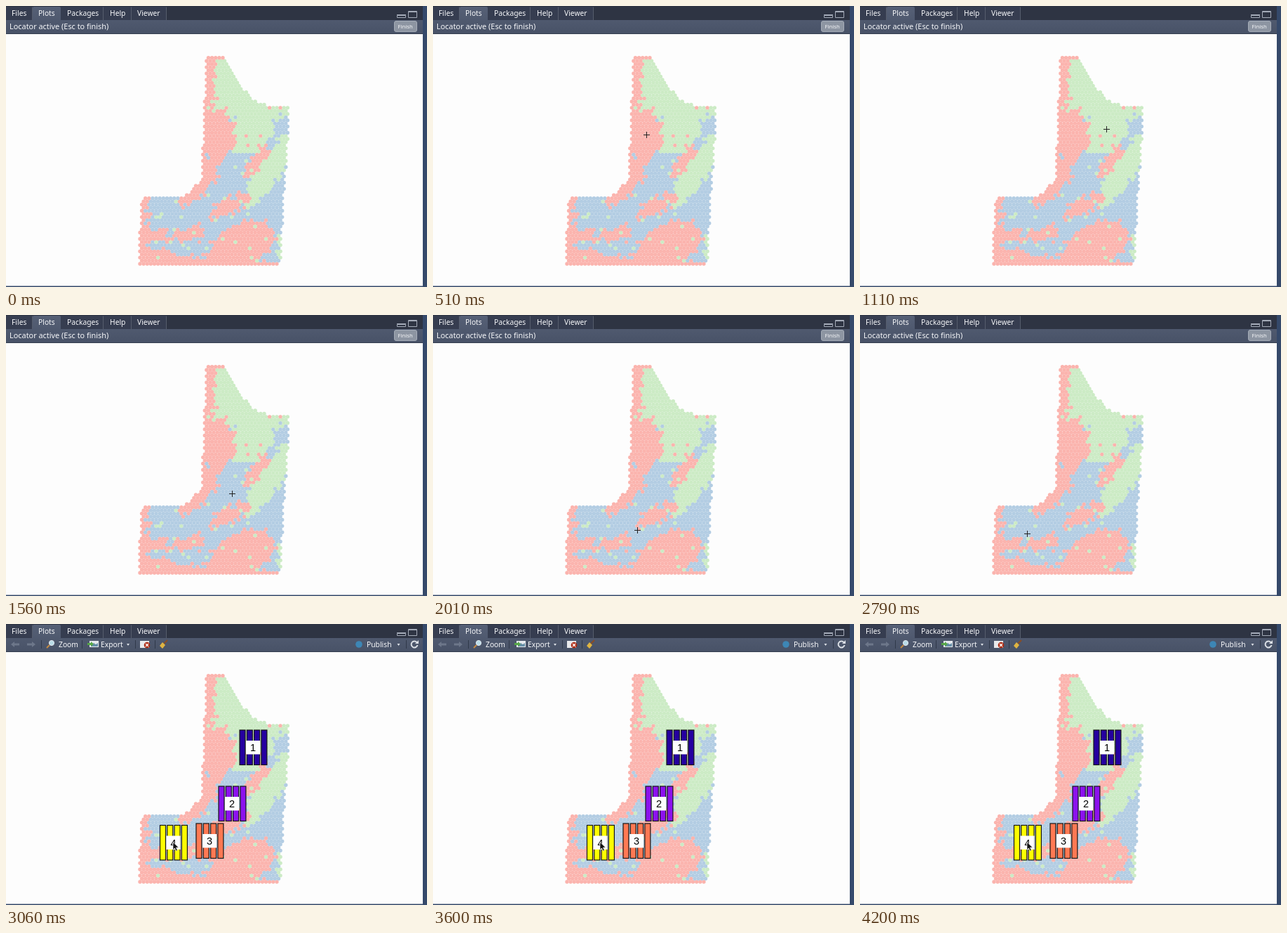
These frames come from a looping animation (600 by 400 pixels, 4.23 s). An HTML page with a canvas:

```html
<!DOCTYPE html>
<html lang="en">
<head>
<meta charset="utf-8">
<title>Plot locator</title>
<style>
  html, body { margin: 0; width: 100%; height: 100%; overflow: hidden; background: #fdfdfd; }
  canvas, svg { position: absolute; left: 0; top: 0; width: 600px; height: 400px; }
  text { font: 500 10.3px "Noto Sans", "Open Sans", sans-serif; fill: #f7f8fa; }
  .digit { font: 14.5px "Liberation Sans", Arial, sans-serif; fill: #000; text-anchor: middle; }
</style>
</head>
<body>
<canvas id="map" width="600" height="400"></canvas>
<svg viewBox="0 0 600 400">
  <defs>
    <linearGradient id="bar" x2="0" y2="1">
      <stop stop-color="#566076"/><stop offset="1" stop-color="#485267"/>
    </linearGradient>
  </defs>

  <!-- pane header -->
  <path fill="#2e3443" d="M0 0H595V21H0z"/>
  <path fill="#363d50" d="M0 1H228V20H0z"/>
  <path stroke="#565d6d" d="M37.5 20V1.5M138.5 20V1.5M178.5 20V1.5M228.5 20V1.5"/>
  <path fill="url(#bar)" d="M0 20H38V3q0-2 2-2H76q2 0 2 2V20H594V40H0z"/>
  <path stroke="#353e50" d="M0 39.5H594"/>
  <text x="8" y="13.5">Files</text>
  <text x="46" y="13.5">Plots</text>
  <text x="87" y="13.5">Packages</text>
  <text x="148" y="13.5">Help</text>
  <text x="187" y="13.5">Viewer</text>
  <g fill="none" stroke="#a4abb8">
    <path d="M557.5 13.5h12v3h-12zM557 12.500h13"/>
    <path d="M573.5 7.5h12v9h-12zM573.5 8.5h12"/>
  </g>
  <path fill="#35496a" d="M594 0h6v400H0v-1.5H594z"/>

  <g id="locating">
    <text x="5" y="33" style="font-size:10.9px">Locator active (Esc to finish)</text>
    <rect x="553.5" y="21.5" width="32" height="15" rx="2.5" fill="#8d95a2" stroke="#a5acb8"/>
    <text x="558.5" y="32" style="font-size:7.7px">Finish</text>
  </g>

  <g id="done">
    <path fill="#6d778a" d="M7 29l5-4v2.5h7v3h-7V33zM42 29l-5-4v2.5h-7v3h7V33z"/>
    <path stroke="#30394a" d="M50.5 23V35M108.5 23V35M184.5 23V35M212.5 23V35M570.5 23V35"/>
    <circle cx="65" cy="27" r="3.6" fill="#b9dce8" stroke="#e3e8ee"/>
    <path stroke="#c58b43" stroke-width="2" d="M62 30l-4 4"/>
    <text x="75" y="32.5">Zoom</text>
    <path fill="#e7eaee" d="M119 24h13v9h-13z"/>
    <path fill="#668fa8" d="M121 31l4-4 3 2 3-2v5h-10z"/>
    <path fill="#55a647" d="M116 27h5v-2l4 3.5-4 3.5v-2h-5z"/>
    <text x="135" y="32.5">Export</text>
    <path fill="#dce0e6" d="M172 28h4l-2 3zM557.5 28h4l-2 3z"/>
    <path fill="#e9eaec" d="M191 24h13v10h-13z"/>
    <circle cx="201" cy="30" r="4.3" fill="#ae2b13"/>
    <path stroke="#fff" stroke-width="1.3" d="M199 28l4 4m0-4l-4 4"/>
    <path stroke="#8a4d24" stroke-width="2" d="M230 23l-5 5"/>
    <path fill="#dfb442" d="M223 26l4 4-4 5-4-4z"/>
    <circle cx="503" cy="29" r="4.8" fill="#3d86b5"/>
    <text x="514" y="32.5">Publish</text>
    <path fill="none" stroke="#dce0e6" stroke-width="2" d="M585.5 26a4.5 4.5 0 1 0 1 4"/>
    <path fill="#dce0e6" d="M588 23v5h-5z"/>
    <g id="plots"></g>
  </g>

  <path id="cross" stroke="#222" d="M-4.5 0h9M0-4.5v9"/>
  <path id="arrow" fill="#111" stroke="#fff" stroke-width=".6"
        d="M238 310.500v11l2.500-2.400 1.800 4 2-.9-1.800-3.900h3.500z"/>
</svg>
<script>
const $ = id => document.getElementById(id);
const LOOP = 4230, DONE = 3000, GLIDE = 480;
const PINK = "#fbb4ae", BLUE = "#b3cde3", LIME = "#ccebc5";

const ctx = $("map").getContext("2d");
let seed = 7;
const random = () => (seed = seed * 16807 % 2147483647) / 2147483647;
const jitter = size => (random() - .5) * size;

const outline = new Path2D(`M286 71H311L345 127Q355 139 372 141H404L401 200 396 270 391 362
  384 369H188L194 273H246Q268 264 279 242L285 95z`);

// Patches of land cover are tilted ellipses: centre, half axes, degrees.
function patch(x, y, long, short, angle) {
  const path = new Path2D();
  path.ellipse(x, y, long, short, angle * Math.PI / 180, 0, 7);
  return path;
}
const pinkPatches = [
  patch(291, 108, 46, 7, 93), patch(301, 181, 34, 25, 90), patch(288, 235, 50, 13, 117),
  patch(266, 267, 24, 9, -35), patch(356, 223, 29, 8, -55), patch(320, 284, 34, 11, -27),
  patch(333, 346, 56, 33, -32), patch(195, 325, 55, 8, 92), patch(225, 361, 62, 13, 8),
  patch(218, 327, 18, 9, 15), patch(262, 324, 23, 11, -10)
];
const limePatches = [
  patch(352, 172, 44, 28, 120), patch(375, 235, 62, 17, -57), patch(392, 345, 24, 4, 95)
];

function cover(x, y) {
  const px = x + jitter(10), py = y + jitter(10);
  const within = paths => paths.some(path => ctx.isPointInPath(path, px, py));
  if (random() < .02) return y < 200 ? PINK : LIME;
  if (within(pinkPatches)) return PINK;
  return py < 158 || within(limePatches) ? LIME : BLUE;
}

function drawMap() {
  const step = 5.13, rise = step * Math.sqrt(3) / 2, rows = 66;
  for (let row = 0; row <= rows; row++) {
    const y = 367 - row * rise;
    let rim = true;
    for (let x = 191 + row % 2 * step / 2; x < 408; x += step) {
      if (!ctx.isPointInPath(outline, x, y)) continue;
      const color = cover(x, y);
      ctx.fillStyle = rim || row % rows === 0 ? PINK : color;
      ctx.beginPath();
      ctx.arc(x, y, 2.7, 0, 7);
      ctx.fill();
      rim = false;
    }
  }
}

// Each plot is placed where the pointer has come to rest at time "at".
const plots = [
  { x: 352, y: 175.5, color: "#2500a0", at: 620 },
  { x: 322, y: 255.5, color: "#8c12ee", at: 1590 },
  { x: 290, y: 308.5, color: "#ff7953", at: 2070 },
  { x: 238.5, y: 311, color: "#ffff00", at: 2670 }
];

function plotMarkup({ x, y, color }, i) {
  const bars = [0, 1, 2, 3].map(n =>
    `<rect x="${x - 19 + n * 10.3}" y="${y - 24.5}" width="8" height="49.5"/>`).join("");
  return `<g fill="${color}" stroke="#151515" stroke-width="1.2">${bars}</g>
    <rect x="${x - 10}" y="${y - 9.5}" width="20" height="19.5" fill="#fdfdfd"/>
    <text class="digit" x="${x}" y="${y + 5.5}">${i + 1}</text>`;
}

function pointer(t) {
  let x = -12, y = 239;
  for (const plot of plots) {
    const p = Math.min(1, Math.max(0, (t - plot.at + GLIDE) / GLIDE));
    const eased = p * p * (3 - 2 * p);
    x += (plot.x - x) * eased;
    y += (plot.y - y) * eased;
  }
  return [x, y].map(v => Math.floor(v) + .5);
}

const show = (id, on) => $(id).style.display = on ? "" : "none";

function frame() {
  const t = performance.now() % LOOP, done = t >= DONE;
  show("locating", !done);
  show("cross", !done);
  show("done", done);
  show("arrow", done);
  $("cross").setAttribute("transform", `translate(${pointer(t)})`);
  requestAnimationFrame(frame);
}

drawMap();
$("plots").innerHTML = plots.map(plotMarkup).join("");
frame();
</script>
</body>
</html>
```
